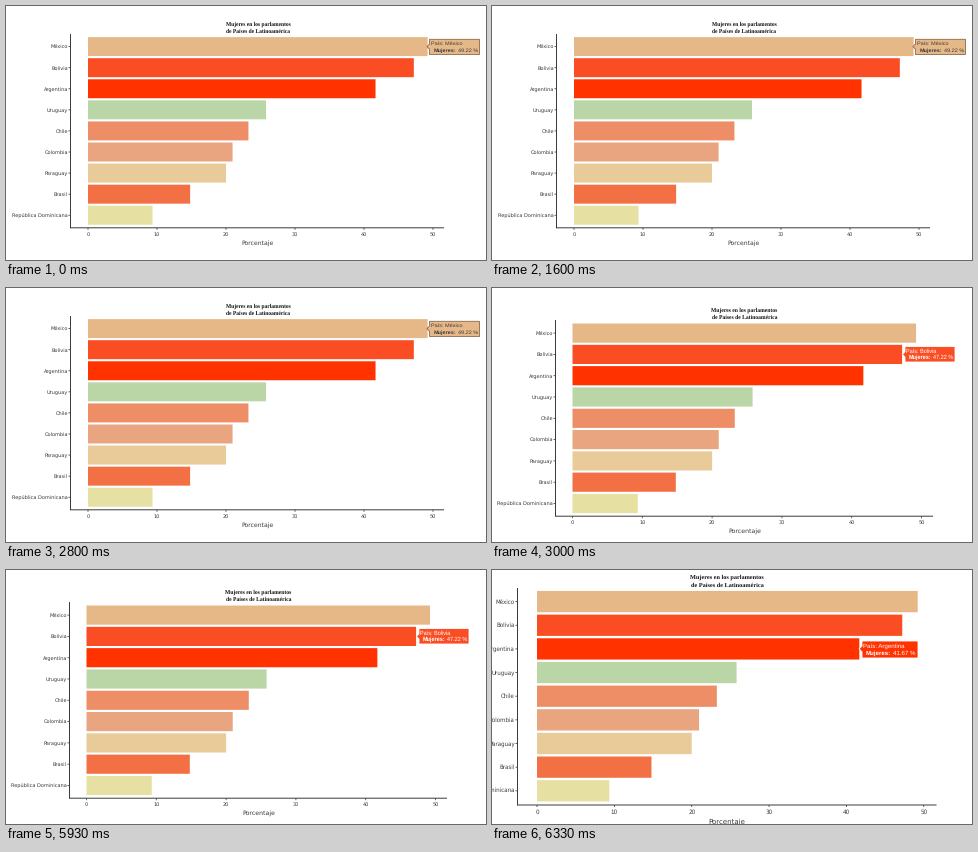
These frames come from a looping animation (480 by 254 pixels, 8.99 s). A matplotlib script:

```python
import matplotlib.pyplot as plt
from matplotlib.animation import FuncAnimation
from matplotlib.patches import Polygon, Rectangle

W, H, DPI = 480, 254, 100
FRAMES, INTERVAL = 155, 58
INK = "#3a3a3a"

plt.rcParams["text.hinting"] = "none"

BARS = [
    ("México", 49.22, "#e6b888"),
    ("Bolivia", 47.22, "#fa4d23"),
    ("Argentina", 41.67, "#ff3200"),
    ("Uruguay", 25.8, "#bad6a6"),
    ("Chile", 23.25, "#ee8e67"),
    ("Colombia", 20.95, "#e8a580"),
    ("Paraguay", 20.0, "#e8cb98"),
    ("Brasil", 14.8, "#f27043"),
    ("República Dominicana", 9.35, "#e6e0a2"),
]

# Start time in ms, then the layout of each view in pixels
VIEWS = [
    dict(start=0, x0=82, unit=6.9, y0=40.6, step=21.08, axis=(64.5, 28, 438, 221.8),
         mid=252, title=(18.2, 25.2), ticks=227.8, xlabel=236.2,
         pick=0, tip=(423.5, 33.3, 473.5, 48.5), text=INK, edge="#86694b"),
    dict(start=2990, x0=80.5, unit=6.98, y0=45.1, step=21.3, axis=(63.5, 32, 441, 228.2),
         mid=252.5, title=(22.0, 29.4), ticks=234.2, xlabel=242.4,
         pick=1, tip=(413, 58.5, 463, 74), text="white", edge="white"),
    dict(start=5990, x0=45, unit=7.735, y0=31.6, step=23.65, axis=(25.5, 18, 444.5, 235),
         mid=235, title=(6.4, 14.6), ticks=241.6, xlabel=250.6,
         pick=2, tip=(370, 71, 426, 88), text="white", edge="white"),
]

fig = plt.figure(figsize=(W / DPI, H / DPI), dpi=DPI, facecolor="white")


def label(ax, x, y, text, px, ha="center", **style):
    """Write text whose capitals are centred on y; px is the em size."""
    style = {"color": INK, "family": "DejaVu Sans"} | style
    return ax.text(x, y + 0.36 * px, text, fontsize=px * 72 / DPI,
                   ha=ha, va="baseline", **style)


def line(ax, xs, ys, width=1.0):
    ax.plot(xs, ys, color="#3c3c3c", lw=width * 72 / DPI,
            solid_capstyle="butt", snap=False)


def draw_tip(ax, view, scale):
    name, value, color = BARS[view["pick"]]
    left, top, right, bottom = view["tip"]
    mid = view["y0"] + view["pick"] * view["step"]
    notch = 2.6 * scale
    outline = [(left - notch, mid), (left, mid - notch), (left, top), (right, top),
               (right, bottom), (left, bottom), (left, mid + notch)]
    ax.add_patch(Polygon(outline, fc=color, ec=view["edge"], lw=0.6,
                         snap=False, zorder=3))

    px = 5.5 * scale
    style = dict(ha="left", color=view["text"], family="Liberation Sans", zorder=4)
    label(ax, left + 1.2, top + 4.1 * scale, f"País: {name}", px, **style)
    y = top + 10.5 * scale
    key = label(ax, left + 4, y, "Mujeres:", px, weight="bold", **style)
    end = key.get_window_extent().x1
    label(ax, end + 0.27 * px, y, f"{value:.2f} %", px, **style)


def draw_view(view):
    ax = fig.add_axes((0, 0, 1, 1))
    ax.set(xlim=(0, W), ylim=(H, 0))
    ax.axis("off")
    scale = view["unit"] / 6.9
    x0, unit = view["x0"], view["unit"]
    left, top, right, bottom = view["axis"]

    for row, text in zip(view["title"], ("Mujeres en los parlamentos",
                                         "de Países de Latinoamérica")):
        label(ax, view["mid"], row, text, 5.55 * scale, weight="bold",
              family="Liberation Serif", color="#111111")

    thick = 0.9 * view["step"]
    for i, (name, value, color) in enumerate(BARS):
        y = view["y0"] + i * view["step"]
        ax.add_patch(Rectangle((x0, y - thick / 2), value * unit, thick,
                               fc=color, lw=0, snap=False))
        label(ax, left - 2.6, y, name, 4.95 * scale, ha="right")
        line(ax, (left - 2, left), (y, y), 0.8)

    line(ax, (left, left), (top, bottom + 0.5))
    line(ax, (left, right), (bottom, bottom))
    for value in range(0, 51, 10):
        x = x0 + value * unit
        line(ax, (x, x), (bottom, bottom + 2), 0.8)
        label(ax, x, view["ticks"], str(value), 5 * scale)
    label(ax, view["mid"], view["xlabel"], "Porcentaje", 6.2 * scale)

    draw_tip(ax, view, scale)
    return ax


axes = [draw_view(view) for view in VIEWS]


def update(frame):
    # A cut falls in the frame that is on screen at its start time
    end = (frame + 1) * INTERVAL
    current = sum(view["start"] < end for view in VIEWS) - 1
    for i, ax in enumerate(axes):
        ax.set_visible(i == current)
    return axes


anim = FuncAnimation(fig, update, frames=FRAMES, init_func=lambda: update(0),
                     interval=INTERVAL, repeat=True, repeat_delay=0, blit=False)
plt.show()
```
